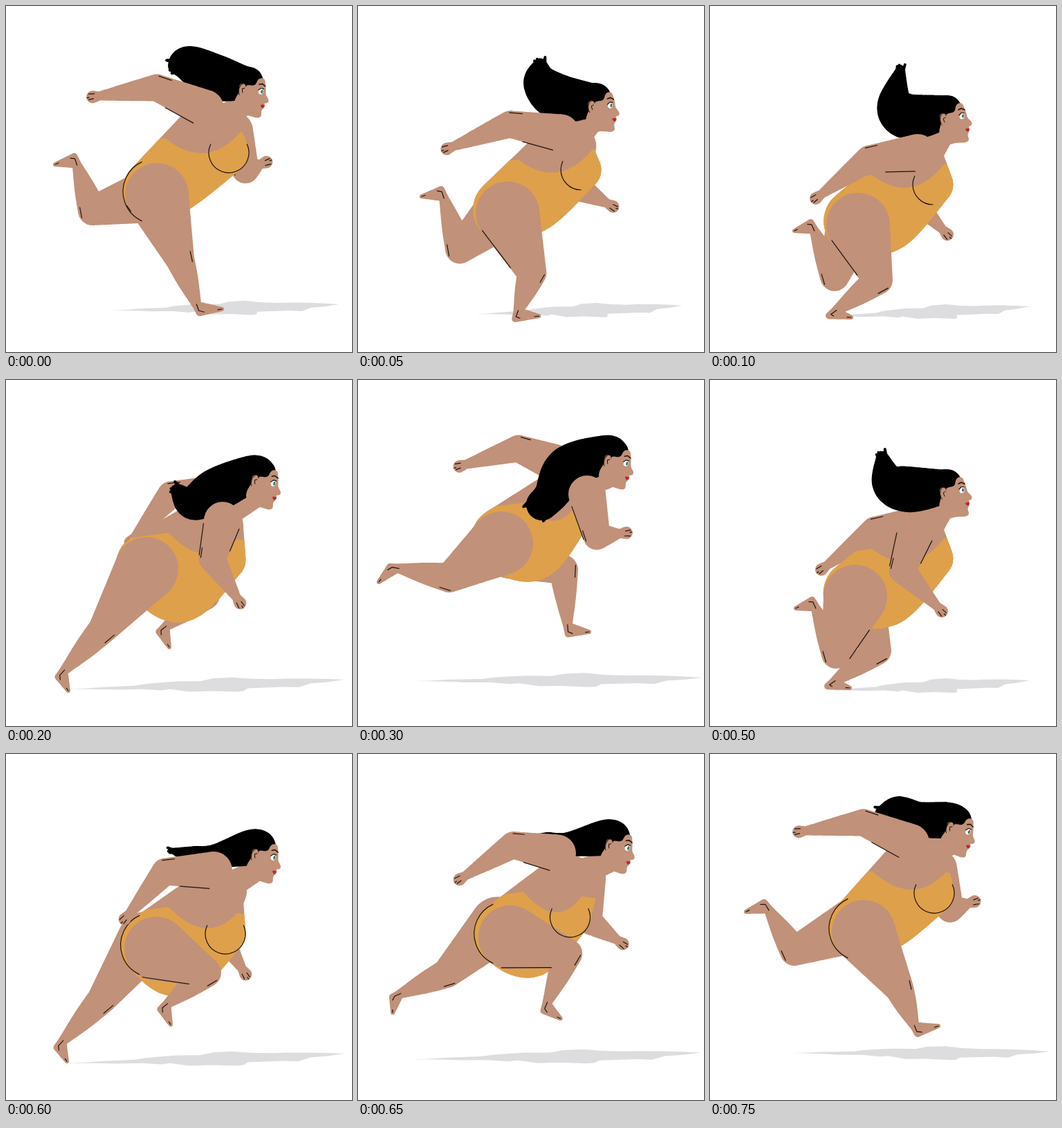
An HTML page with a canvas that plays this animation: 500 px wide and 500 px high, repeating every 0.8 s.

```html
<!DOCTYPE html>
<html lang="en">
<head>
<meta charset="utf-8">
<title>Run cycle</title>
<style>
html, body { margin: 0; width: 100%; height: 100%; overflow: hidden; background: #fff; }
canvas { display: block; width: 500px; height: 500px; }
</style>
</head>
<body>
<canvas id="stage" width="500" height="500"></canvas>
<script>
const ctx = document.getElementById('stage').getContext('2d');
const LOOP = 800, STEP = 50, HALF = LOOP / 2, TAU = 2 * Math.PI;
const SKIN = '#c19179', SUIT = '#dfa04b', INK = '#1c120e', SHADE = '#dddde0';
const FAR_ARM = [8, -4], FAR_LEG = [-2, -5];

// Cyclic spline through a few key poses: { time: [numbers] }.
function track(poses, loop = LOOP) {
  const keys = Object.keys(poses).map(Number), n = keys.length;
  const time = i => keys[(i + n) % n] + loop * Math.floor(i / n);
  return t => {
    t %= loop;
    let i = n - 1;
    while (keys[i] > t) i--;
    const [t0, t1, t2, t3] = [-1, 0, 1, 2].map(k => time(i + k));
    const [a, b, c, d] = [-1, 0, 1, 2].map(k => poses[keys[(i + k + n) % n]]);
    const h = t2 - t1, u = (t - t1) / h, u2 = u * u, u3 = u2 * u;
    return b.map((v, j) => {
      const m1 = (c[j] - a[j]) / (t2 - t0) * h, m2 = (d[j] - v) / (t3 - t1) * h;
      return (2 * u3 - 3 * u2 + 1) * v + (u3 - 2 * u2 + u) * m1 + (3 * u2 - 2 * u3) * c[j] + (u3 - u2) * m2;
    });
  };
}

// Hip, knee, ankle, toe
const legs = track({
  0: [218, 273, 251, 365, 276, 433, 312, 438],
  100: [214, 316, 243, 396, 181, 441, 204, 450],
  200: [203, 273, 140, 360, 83, 421, 90, 449],
  300: [207, 236, 132, 286, 57, 272, 30, 292],
  350: [212, 252, 124, 290, 86, 229, 54, 233],
  400: [214, 278, 127, 301, 104, 233, 73, 234],
  500: [210, 313, 182, 396, 152, 328, 124, 330],
  600: [217, 281, 290, 316, 232, 362, 238, 391],
  700: [222, 252, 299, 279, 305, 361, 336, 369],
  750: [222, 257, 273, 338, 296, 394, 330, 393]
});
// Shoulder, elbow, wrist
const arms = track({
  0: [288, 148, 218, 118, 135, 130],
  100: [300, 212, 230, 221, 161, 272],
  200: [313, 203, 298, 258, 333, 314],
  300: [331, 165, 345, 226, 378, 222],
  350: [322, 169, 339, 228, 365, 220],
  400: [322, 184, 338, 241, 359, 233],
  500: [298, 218, 278, 275, 328, 327],
  600: [300, 168, 230, 170, 178, 231],
  700: [277, 124, 224, 103, 148, 126],
  750: [290, 128, 222, 99, 138, 111]
});
// Chest, bust, belly
const bodies = track({
  0: [293, 182, 322, 212, 260, 246],
  100: [297, 235, 322, 258, 258, 312],
  200: [298, 212, 317, 260, 252, 308],
  300: [305, 168, 300, 208, 253, 248],
  350: [297, 160, 324, 201, 263, 236]
}, HALF);
// Ear, tilt in degrees
const heads = track({
  0: [342, 121, 16], 100: [338, 164, 0], 200: [360, 146, 18], 300: [361, 117, 18], 350: [347, 107, 22]
}, HALF);
// Middle, tail, tip, fullness, tip radius
const hairs = track({
  0: [300, 102, 264, 83, 247, 86, 1, 13],
  100: [287, 160, 267, 142, 275, 93, 1, 7],
  200: [305, 158, 270, 178, 248, 160, .95, 10],
  300: [304, 128, 280, 165, 266, 180, 1, 23],
  400: [300, 102, 264, 83, 247, 86, 1, 13],
  500: [286, 158, 259, 148, 249, 112, 1, 9],
  600: [302, 147, 268, 146, 240, 140, .5, 4],
  750: [302, 94, 272, 80, 247, 81, .75, 6]
});
// Left tip, right tip
const shadows = track({
  0: [150, 440, 481, 431], 100: [170, 449, 462, 434], 200: [88, 447, 489, 433],
  300: [77, 435, 497, 430], 350: [118, 432, 491, 430]
}, HALF);

const mix = (a, b, u) => a.map((v, i) => v + (b[i] - v) * u);
const add = (p, dx, dy, r = p[2]) => [p[0] + dx, p[1] + dy, r];
const dist = (a, b) => Math.hypot(b[0] - a[0], b[1] - a[1]) || 1;
const beyond = (a, b, d, r) => [0, 1].map(i => b[i] + (b[i] - a[i]) / dist(a, b) * d).concat(r);
const joints = (pose, radii, [dx, dy]) => radii.map((r, i) => [pose[2 * i] + dx, pose[2 * i + 1] + dy, r]);

function random(seed) {
  return () => (seed = seed * 16807 % 2147483647) / 2147483647;
}

// Flesh is a row of circles [x, y, r] swept along a smooth path.
function sweep(path, dots) {
  const get = i => dots[Math.max(0, Math.min(dots.length - 1, i))];
  for (let i = 0; i < dots.length - 1; i++) {
    const [a, b, c, d] = [-1, 0, 1, 2].map(k => get(i + k));
    const steps = Math.ceil(dist(b, c) / 1.5) + 1;
    for (let k = 0; k <= steps; k++) {
      const u = k / steps;
      const [x, y, r] = b.map((v, j) => v + .5 * u * (c[j] - a[j] +
        u * (2 * a[j] - 5 * v + 4 * c[j] - d[j] + u * (3 * (v - c[j]) + d[j] - a[j]))));
      path.moveTo(x + r, y);
      path.arc(x, y, Math.max(r, .5), 0, TAU);
    }
  }
}
function flesh(color, ...chains) {
  const path = new Path2D();
  chains.forEach(c => sweep(path, c));
  ctx.fillStyle = color;
  ctx.fill(path);
  return path;
}

function stroke(build, width = 1.2) {
  ctx.beginPath();
  build();
  ctx.strokeStyle = INK;
  ctx.lineWidth = width;
  ctx.stroke();
}
const line = (pts, width) => stroke(() => pts.forEach(p => ctx.lineTo(p[0], p[1])), width);
const arc = (c, r, from, to) => stroke(() => ctx.arc(c[0], c[1], r, from * TAU / 360, to * TAU / 360));

// Part of the outline between two circles; side is 1 or -1.
function edge(a, b, side, from, to, inset = 1) {
  const d = dist(a, b), nx = (a[1] - b[1]) / d, ny = (b[0] - a[0]) / d;
  line([from, to].map(u => {
    const [x, y, r] = mix(a, b, u);
    return [x + nx * r * side * inset, y + ny * r * side * inset];
  }));
}

// Closed outline through x y pairs; round joins it with curves.
function shape(v, color) {
  const n = v.length / 2, p = i => [v[i % n * 2], v[i % n * 2 + 1]];
  ctx.beginPath();
  ctx.moveTo(...mix(p(0), p(1), .5));
  for (let i = 1; i <= n; i++) ctx.quadraticCurveTo(...p(i), ...mix(p(i), p(i + 1), .5));
  ctx.fillStyle = color;
  ctx.fill();
}

function leg(t, hipSize, offset) {
  const [hip, knee, ankle, toe] = joints(legs(t), [hipSize, 21, 6.5, 3], offset);
  const calf = [...mix(knee, ankle, .42).slice(0, 2), 16];
  const heel = beyond(knee, ankle, 11, 5);
  flesh(SKIN, [hip, knee], [knee, calf, ankle], [ankle, heel], [ankle, toe], [heel, toe],
    [mix(ankle, heel, .5), toe]);
  edge(knee, calf, -1, -.15, .35, .82);
  line([mix(knee, ankle, .97), mix(ankle, heel, .7), mix(heel, toe, .2)]);
  line([toe, mix(toe, heel, .18)]);
  return { hip, knee };
}

function arm(t, offset) {
  const [shoulder, elbow, wrist] = joints(arms(t), [27, 19.5, 6.5], offset);
  const forearm = [...mix(elbow, wrist, .47).slice(0, 2), 13.5];
  const fist = beyond(elbow, wrist, 10, 9);
  flesh(SKIN, [shoulder, elbow], [elbow, forearm, wrist], [wrist, fist]);
  edge(elbow, shoulder, -1, -.05, .2, .86);
  edge(wrist, fist, 1, .7, 1.5, .5);
  edge(wrist, fist, -1, .9, 1.6, .3);
  line([beyond(elbow, wrist, 15, 0), beyond(elbow, wrist, 18, 0)]);
  return { shoulder, elbow };
}

function body(t, hip, knee) {
  const [chest, bust, belly] = joints(bodies(t), [45, 29.5, 42], [0, 0]);
  const seat = add(hip, (hip[0] - knee[0]) * .06, -5, 48);
  const ear = heads(t);
  const path = flesh(SKIN, [seat, belly, bust], [seat, chest], [belly, chest], [chest, bust],
    [add(chest, 18, -18, 20), [ear[0] - 3, ear[1] + 25, 16]]);
  ctx.save();
  ctx.clip(path);
  ctx.beginPath();
  const back = add(chest, -63, 9), front = add(bust, 17, -30);
  ctx.moveTo(back[0], back[1]);
  ctx.quadraticCurveTo((back[0] + front[0]) / 2 + 5, (back[1] + front[1]) / 2 + 52, front[0], front[1]);
  [[500, front[1] + 25], [500, 500], [0, 500], [0, back[1] + 30]].forEach(p => ctx.lineTo(...p));
  ctx.fillStyle = SUIT;
  ctx.fill();
  ctx.restore();
  return { seat, bust };
}

function hairAndHead(t) {
  const [x, y, tilt] = heads(t), h = hairs(t), full = h[6];
  const a = tilt * Math.PI / 180;
  const local = (u, v, r) => [x + u * Math.cos(a) - v * Math.sin(a), y + u * Math.sin(a) + v * Math.cos(a), r];
  const crown = local(-8, -9, 26);
  const [middle, tail, tip] = joints(h, [33 * full, 25 * full, h[7]], [0, 0]);
  const rnd = random(11), lobes = [];
  for (let i = -2; i <= 2; i++) {
    const root = mix(tail, tip, .75), end = beyond(tail, tip, h[7] * .7 + rnd() * 5, 2);
    const w = i * h[7] * .38, d = dist(tail, tip);
    const nx = (tail[1] - tip[1]) / d * w, ny = (tip[0] - tail[0]) / d * w;
    lobes.push([add(root, nx * .6, ny * .6, h[7] * .4), add(end, nx, ny)]);
  }
  flesh('#000', [local(5, -14, 21), crown, middle, tail, tip], ...lobes);

  ctx.save();
  ctx.translate(x, y);
  ctx.rotate(a);
  shape([17, -22, 26, -25, 30, -16, 33, -7, 34, -2, 41, 4, 40, 9, 35, 10, 38, 14, 36, 18, 34, 22, 37, 30,
    31, 34, 18, 33, 4, 38, -8, 24, -5, 6, 3, -9, 16, -10], SKIN);
  flesh(SKIN, [[-1, -4, 5], [0, 4, 4.5]]);
  stroke(() => ctx.ellipse(-.5, 0, 5, 9, 0, 2, 5.6), 1);
  line([[2, -3], [-1, -1], [1, 4]], 1);
  ctx.fillStyle = '#fff';
  ctx.beginPath(); ctx.ellipse(26, -5, 3.5, 4.5, 0, 0, TAU); ctx.fill();
  ctx.fillStyle = '#287c78';
  ctx.beginPath(); ctx.ellipse(27.5, -5, 1.5, 2.8, 0, 0, TAU); ctx.fill();
  line([[22, -6], [25, -9.5], [29, -9.5]]);
  line([[21, -14], [25, -16], [30, -14]], 1.6);
  shape([30, 14, 36, 12, 37, 15, 35, 18, 33, 17], '#c5202f');
  ctx.restore();
}

function shadow(t) {
  const [x0, y0, x1, y1] = shadows(t), rnd = random(5), top = [], bottom = [];
  for (let i = 0; i <= 16; i++) {
    const u = i / 16, thick = Math.sin(Math.PI * u ** 1.4);
    const x = () => x0 + (x1 - x0) * u + (rnd() - .5) * 44 * thick;
    const y = y0 + (y1 - y0) * u;
    top.push([x(), y - thick * (4 + rnd() * 5)]);
    bottom.unshift([x(), y + thick * (5 + rnd() * 8)]);
  }
  ctx.beginPath();
  top.concat(bottom).forEach(p => ctx.lineTo(...p));
  ctx.fillStyle = SHADE;
  ctx.fill();
}

function draw(t) {
  const striding = t < 50 || t >= 600, armAhead = t >= 150 && t < 550;
  ctx.fillStyle = '#fff';
  ctx.fillRect(0, 0, 500, 500);
  shadow(t);
  arm(t + HALF, FAR_ARM);
  leg(t + HALF, 40, FAR_LEG);
  const pose = joints(legs(t), [46, 21], [0, 0]);
  const { seat, bust } = body(t, ...pose);
  const { hip, knee } = leg(t, 46, [0, 0]);

  if (striding) arc(seat, 47, 115, 245);
  if (t < 200 || t >= 550 && t < 700) edge(hip, knee, 1, striding ? 0 : .1, t < 50 ? .1 : .8);
  if (t >= 450 && t < 550) edge(hip, knee, -1, .45, 1);
  if (!armAhead) arc(bust, 29, striding ? -25 : 90, 205);

  hairAndHead(t);
  const { shoulder, elbow } = arm(t, [0, 0]);
  if (armAhead) edge(elbow, shoulder, -1, 0, .8);
  if (t < 250 || t >= 450) edge(elbow, shoulder, 1, .3, .9);
}

ctx.lineCap = ctx.lineJoin = 'round';
const start = performance.now();
function tick() {
  const ms = (performance.now() - start) % LOOP;
  draw(Math.floor(ms / STEP) * STEP);
  requestAnimationFrame(tick);
}
tick();
</script>
</body>
</html>
```
